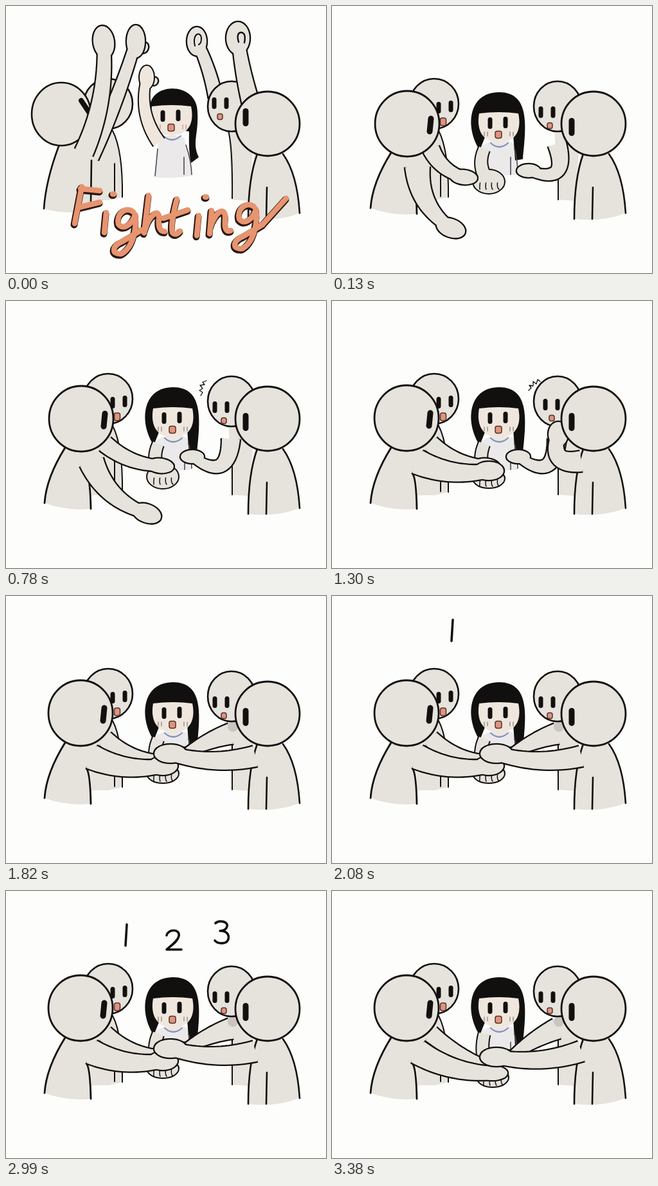
An HTML page with a canvas for the animation above (3.51 s loop, 498 px wide and 415 px high).

```html
<!DOCTYPE html>
<html>
<head>
<meta charset="utf-8">
<style>
  html, body { margin: 0; width: 100%; height: 100%; overflow: hidden; background: #fdfefc; }
  canvas { display: block; width: 100%; height: 100%; }
</style>
</head>
<body>
<canvas id="stage" width="498" height="415"></canvas>
<script>
const ctx = document.getElementById('stage').getContext('2d');
const STEP = 130, STEPS = 27;
const PAPER = '#fdfefc', SKIN = '#e6e2dc', FACE = '#efe7dd', INK = '#12100f';
const SHIRT = '#ebe9ea', CORAL = '#e7946f', SHADOW = '#2a1712';

// Brush strokes per letter, with the distance to the next letter
const GLYPHS = {
  F: [47, 'M11 281 L0 338 M9 284 L39 287 M6 313 L39 305'],
  i: [19, 'M2 320 L-1 351 M12 291 h2'],
  g: [42, 'M25 320 C12 310 -2 325 2 339 C10 350 24 338 28 324 C31 345 25 375 7 385 C-10 387 -8 372 8 366 L38 348'],
  h: [43, 'M7 298 L0 356 M1 352 C8 328 24 316 23 334 Q21 354 32 354'],
  t: [40, 'M8 300 Q-2 338 1 352 Q6 358 13 350 M-13 330 L25 317'],
  n: [44, 'M3 318 L0 354 M1 344 C9 318 26 310 24 332 Q22 353 33 349']
};
const DIGITS = [
  'M188 52 L186 85',
  'M250 69 C252 59 271 58 269 70 C267 79 256 85 250 91 H273',
  'M326 50 C332 45 346 47 344 55 Q342 62 333 62 C350 61 350 80 338 81 Q329 82 325 77'
];

const lerp = (a, b, f) => a + (b - a) * f;
const mix = (p, q, f) => p.map((v, i) => lerp(v, q[i], f));
const ramp = (step, from, to) => Math.min(1, Math.max(0, (step - from) / (to - from)));
const lowering = step => ramp(step, 24, 26);

function shifted(x, y, action) {
  ctx.save();
  ctx.translate(x, y);
  action();
  ctx.restore();
}

function paint(d, fill, stroke, width = 2.6) {
  const path = new Path2D(d);
  if (fill) { ctx.fillStyle = fill; ctx.fill(path); }
  if (stroke) { ctx.strokeStyle = stroke; ctx.lineWidth = width; ctx.stroke(path); }
}

function oval(x, y, rx, ry, width = 2.6, fill = SKIN, turn = 0) {
  ctx.beginPath();
  ctx.ellipse(x, y, rx, ry, turn, 0, Math.PI * 2);
  ctx.fillStyle = fill;
  ctx.fill();
  if (!width) return;
  ctx.strokeStyle = INK;
  ctx.lineWidth = width;
  ctx.stroke();
}

function eye(x, y, height = 18, width = 7, lean = 0) {
  const h = (height - width) / 2;
  paint(`M${x + lean} ${y - h} L${x - lean} ${y + h}`, null, INK, width);
}

function mouth(x, y, w, h) {
  ctx.beginPath();
  ctx.roundRect(x - w / 2, y - h / 2, w, h, 3);
  ctx.fillStyle = '#e0947e';
  ctx.fill();
  ctx.strokeStyle = '#54312b';
  ctx.lineWidth = 1.5;
  ctx.stroke();
}

// A tapered, sagging arm and its palm, drawn as one silhouette
function arm({ from, to, sag = 0, taper, palm, turn = 0, line = 2.3, fill = SKIN }) {
  const [x0, y0] = from, [x1, y1] = to;
  const reach = Math.hypot(x1 - x0, y1 - y0);
  const cx = (x0 + x1) / 2 - (y1 - y0) / reach * 2 * sag;
  const cy = (y0 + y1) / 2 + (x1 - x0) / reach * 2 * sag;
  const left = [], right = [];
  for (let t = 0; t <= 1; t += 0.05) {
    const s = 1 - t;
    const x = s * s * x0 + 2 * s * t * cx + t * t * x1;
    const y = s * s * y0 + 2 * s * t * cy + t * t * y1;
    const dx = lerp(cx - x0, x1 - cx, t), dy = lerp(cy - y0, y1 - cy, t);
    const k = lerp(...taper, t) / 2 / Math.hypot(dx, dy);
    left.push(`${x - dy * k} ${y + dx * k}`);
    right.unshift(`${x + dy * k} ${y - dx * k}`);
  }
  oval(x1, y1, ...palm, line * 2, fill, turn);
  ctx.lineCap = 'butt';
  paint(`M${left.join('L')}M${right.join('L')}`, null, INK, line * 2);
  ctx.lineCap = 'round';
  paint(`M${left.join('L')}L${right.join('L')}Z`, fill);
  oval(x1, y1, ...palm, 0, fill, turn);
}

function girl(step, cheer) {
  paint(cheer ? 'M238 206 Q260 196 278 206 L289 264 Q260 269 232 266Z'
              : 'M232 218 Q260 200 284 214 L290 262 L236 266Z', SHIRT);
  if (cheer) {
    paint('M224 162 C220 117 298 116 298 165 C300 200 289 212 300 235 L288 244 Q284 228 285 195 L226 186Z', INK);
    paint('M236 222 L232 264 M280 216 Q288 240 289 262 M277 235 V262', null, '#4b4750', 1.6);
  } else {
    paint('M230 224 C207 190 211 134 260 134 C309 134 302 188 297 238 L285 240 L282 200 L238 204Z', INK);
    paint('M284 222 Q289 240 289 260 M278 235 V262', null, '#4b4750', 1.6);
  }
  shifted(cheer ? -2 : 0, cheer ? -11 : 0, () => {
    paint('M247 213 Q260 225 274 213', FACE, '#8290c2', 2.2);
    paint('M229 167 Q260 163 290 167 C296 195 284 212 260 212 C236 212 224 195 229 167Z', FACE);
    eye(246, 182);
    eye(270, 181);
    mouth(259, 200, 10, 11);
    for (const x of [237, 242, 277, 282]) paint(`M${x} 196 v6`, null, cheer ? '#cf9384' : '#8f837d', 1.3);
  });

  if (cheer) {
    oval(231, 117, 6, 7, 2.4, FACE, 0.4);
    arm({ from: [238, 212], to: [219, 111], sag: -12, taper: [20, 14], palm: [11, 18], line: 2, fill: FACE });
    return;
  }
  const join = ramp(step, 6, 8);
  const [x, y] = mix([244, 273 + 3 * join], [250, 290], lowering(step));
  arm({ from: [237, 222], to: [x, y], sag: 8, taper: [17, 20], palm: [24, 18 - 4 * join], line: 2 });
  for (let i = -1.5; i <= 1.5; i++) paint(`M${x + i * 9} ${y + 2} q-1 7 ${i + 1} 10`, null, INK, 1.5);
}

function backLeft(step, cheer) {
  paint('M128 205 L166 193 Q182 225 181 297 L160 302 H133Z', SKIN);
  paint('M166 194 Q182 225 181 297 M169 245 V296', null, INK, 2);
  oval(159, 152, 38, 39);
  if (cheer) {
    oval(215, 65, 7, 9, 2.4, SKIN, 0.4);
    arm({ from: [132, 235], to: [202, 55], sag: 4, taper: [24, 16], palm: [14, 25] });
    return;
  }
  eye(166, 158);
  eye(185, 156);
  mouth(173, 180, 9, 12);
  const low = lowering(step);
  const joined = mix([205, 266], [240, 256], ramp(step, 1, 3));
  arm({ from: [154, 222], to: mix(joined, [235, 270], low), sag: lerp(8, 4, low), taper: [26, 16], palm: [21, 11], turn: 0.1 });
}

function backRight(step, cheer) {
  paint('M346 190 L386 205 L378 303 L352 301Z', SKIN);
  paint(cheer ? 'M345 190 Q353 215 352 299' : 'M352 228 V301', null, INK, 2);
  if (cheer) {
    arm({ from: [326, 142], to: [297, 55], sag: 3, taper: [21, 16], palm: [15, 22] });
    paint('M294 62 C289 42 304 38 304 51 Q304 58 300 60', null, INK, 2);
  } else {
    const straight = ramp(step, 11, 13);
    arm({
      from: [350, 214], sag: lerp(-31, 3, straight), taper: [28 + 4 * straight, 13], palm: [18, 10],
      to: mix(mix([306, 256], [290, 242], ramp(step, 1, 3)), [278, 246 + 12 * lowering(step)], straight)
    });
    if (step > 12) oval(353, 203, 8, 8, 0, '#c9c5c0');
  }
  oval(351, 156, 37, 39);

  const startled = step >= 7 && step <= 11;
  const [dx, dy] = cheer ? [-1, -14] : startled ? [7, -4] : [0, 0];
  shifted(dx, dy, () => {
    eye(325, 165);
    eye(344, 165);
    mouth(startled ? 335 : cheer ? 334 : 339, 186, 8, 9);
  });
  if (startled) paint('M306 139 l4 -4 l-3 -4 l6 1 v-7 l5 4 l2 -7 l4 3', null, INK, 1.3);
  else if (step >= 2 && step < 7) paint('M312 124 l-6 2 l3 4 l-7 1 l4 5 l-5 3 l5 3 l-3 5', null, INK, 1.3);
}

function frontLeft(step, cheer) {
  if (cheer) {
    paint('M82 214 C70 250 61 285 59 315 Q95 325 132 318 L134 238 L120 212Z', SKIN);
    paint('M82 218 C70 250 61 285 59 315 M133 240 L132 305', null, INK);
    oval(86, 168, 46, 49);
    eye(123, 156, 26, 8, -6);
    arm({ from: [121, 228], to: [152, 56], sag: 11, taper: [29, 19], palm: [16, 25], turn: -0.15 });
    return;
  }
  paint('M90 226 C75 255 62 285 60 314 Q95 327 132 323 L131 268 L130 226Z', SKIN);
  paint('M92 228 C75 255 62 285 60 314 M125 268 Q131 274 132 323', null, INK, 2.8);
  const join = ramp(step, 6, 8), low = lowering(step);
  const outside = mix([185, 345], [219, 330], ramp(step, 1, 3));
  arm({
    from: [133, 250], to: mix(mix(outside, [244, 264], join), [250, 283], low), sag: lerp(14, 9, join),
    taper: [38, 16 + 4 * join], palm: [23, 14 - 3 * low], turn: 0.35 * (1 - join)
  });
  oval(117 - join, 183 - join, 50, 51, 2.8);
  eye(153 - join, 185 - join, 29, 9, 1);
}

function frontRight(step, cheer) {
  paint('M388 226 C380 260 377 295 377 331 Q420 336 457 322 C455 290 449 255 430 226Z', SKIN);
  paint('M391 230 C380 260 377 295 377 331 M457 322 C455 290 449 255 431 230 M406 282 L405 331', null, INK);
  if (cheer) {
    arm({ from: [382, 155], to: [361, 50], sag: -2, taper: [27, 18], palm: [18, 25] });
    paint('M362 56 Q358 42 366 41 Q374 42 371 57', null, INK, 2.4);
  } else if (step > 8) {
    const swing = ramp(step, 10, 13);
    arm({
      from: [388, 249], to: mix([352, 207], [256, 245 + 13 * lowering(step)], swing),
      sag: lerp(-22, -9, swing), taper: [32, 20], palm: mix([15, 19], [25, 14], swing)
    });
  }
  oval(407, 183, 50, 50, 2.8);
  eye(373, cheer ? 173 : 188, 28, 9);
}

// The letters bob more and more along the word
function lettering(word, color, width) {
  let x = 107;
  [...word].forEach((letter, i) => {
    const [advance, strokes] = GLYPHS[letter];
    shifted(x, 8 * Math.sin(i * Math.PI / 2) * i / 7, () => paint(strokes, null, color, width));
    x += advance;
  });
  paint('M399 340 L436 299', null, color, width);
}

function draw(step) {
  const cheer = step === 0;
  ctx.fillStyle = PAPER;
  ctx.fillRect(0, 0, 498, 415);
  for (const figure of [girl, backLeft, backRight, frontLeft, frontRight]) figure(step, cheer);

  if (cheer) {
    shifted(-1, 2, () => lettering('Fighting', SHADOW, 11));
    lettering('Fighting', CORAL, 8.5);
  }
  DIGITS.forEach((strokes, i) => {
    const age = step - 16 - 2 * i;
    if (age < 0 || step > 24) return;
    // each count drops in; the third waits one step longer
    if (i === 2 && age < 1) return;
    shifted(0, -15 * (1 - ramp(age, 0, 2)), () => paint(strokes, null, INK, 3.6));
  });
}

ctx.lineCap = ctx.lineJoin = 'round';
const begin = performance.now();
function tick() {
  draw(Math.floor((performance.now() - begin) / STEP) % STEPS);
  requestAnimationFrame(tick);
}
tick();
</script>
</body>
</html>
```
